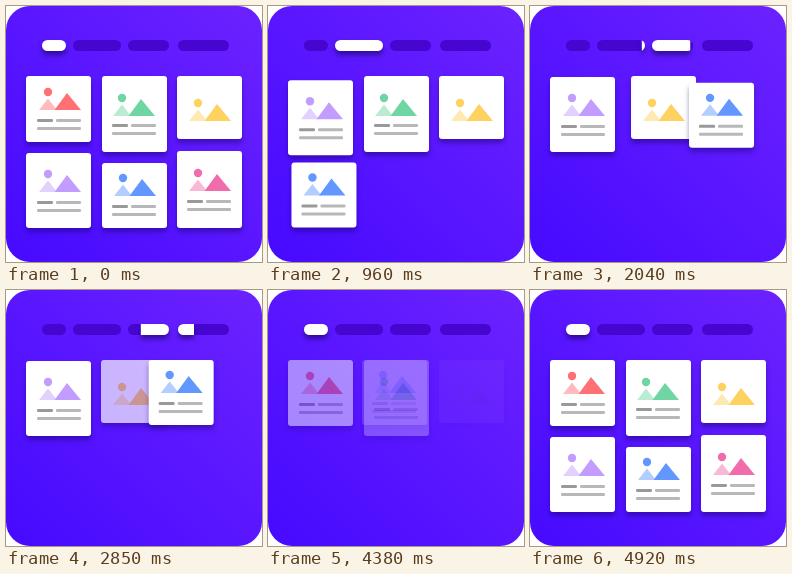
Recreate the animation shown at these times as an HTML page. Size 256 px wide and 256 px high, loop 5010 ms.

```html
<!DOCTYPE html>
<html lang="en">
<head>
<meta charset="utf-8">
<title>Filtered card grid</title>
<style>
  html, body { margin: 0; height: 100%; overflow: hidden; background: #fff; }
  svg { display: block; width: 100vw; height: 100vh; }
  .card { filter: drop-shadow(0 4px 2.5px rgba(20, 0, 90, .42)); }
  .lit { filter: drop-shadow(0 4px 2.5px rgba(10, 0, 60, .5)); }
</style>
</head>
<body>
<svg id="stage" viewBox="0 0 256 256">
  <defs>
    <linearGradient id="bg" x1="0" y1="1" x2="1" y2="0">
      <stop offset="0" stop-color="#460aff"/>
      <stop offset="1" stop-color="#6c22ff"/>
    </linearGradient>
  </defs>
  <rect width="256" height="256" rx="24" fill="url(#bg)"/>
</svg>
<script>
const LOOP = 5010, WIPE = 435;
const SWITCH = [435, 1635, 2715, 3915];   // when each tab hands over to the next
const stage = document.getElementById('stage');

function add(parent, tag, attrs = {}) {
  const el = document.createElementNS('http://www.w3.org/2000/svg', tag);
  for (const k in attrs) el.setAttribute(k, attrs[k]);
  return parent.appendChild(el);
}

const ramp = (t, a, b) => t < a ? 0 : t >= b ? 1 : (t - a) / (b - a);
const mix = (a, b, p) => a + (b - a) * p;

// cubic-bezier(.3, 0, .35, 1)
function ease(x) {
  let lo = 0, hi = 1;
  for (let i = 0; i < 20; i++) {
    const s = (lo + hi) / 2, r = 1 - s;
    if (.9 * s * r * r + 1.05 * s * s * r + s * s * s < x) lo = s; else hi = s;
  }
  return lo * lo * (3 - 2 * lo);
}

// Tabs
const tabs = [[36, 24], [67, 48], [122, 41], [172, 51]].map(([x, width]) => {
  const pill = { x, y: 34, width, height: 11, rx: 5.5 };
  add(stage, 'rect', { ...pill, fill: '#4706cf' });
  return pill;
}).map(pill => add(add(stage, 'g', { class: 'lit' }), 'rect', { ...pill, fill: '#fff' }));

// Cards: icon and lines are offsets inside the card;
// moves are [start, end, x, y], fades are [start, end, opacity]
const fadeIn = i => [4220 + 75 * i, 4545 + 75 * i, 1];
const cards = [
  { x: 20, y: 70, h: 66, color: '#ff7075', icon: [0, 0], lines: [11, 43],
    moves: [], fades: [[435, 705, 0], fadeIn(0)] },
  { x: 96, y: 70, h: 76, color: '#6fd6a3', icon: [-2, 6], lines: [10, 48],
    moves: [], fades: [[1635, 1905, 0], fadeIn(1)] },
  { x: 171, y: 70, h: 63, color: '#ffd15f', icon: [-1, 11],
    moves: [[1635, 2205, 95, 70], [4200, 4200, 171, 70]],
    fades: [[2765, 3035, 0], fadeIn(2)] },
  { x: 20, y: 147, h: 75, color: '#c29cff', icon: [0, 5], lines: [11, 48],
    moves: [[690, 1035, 20, 71], [4440, 4440, 20, 147]],
    fades: [[3915, 4350, 0], fadeIn(3)] },
  { x: 96, y: 157, h: 65, color: '#6197ff', icon: [-1, -1], lines: [10, 42],
    moves: [[690, 1035, 20.3, 156.5], [1635, 2205, 171, 70], [2715, 3165, 94, 70], [4440, 4440, 96, 157]],
    fades: [[4005, 4440, 0], fadeIn(4)] },
  { x: 171, y: 145, h: 77, color: '#f06cab', icon: [-1, 6], lines: [10, 49],
    moves: [], fades: [[485, 755, 0], fadeIn(5)] }
];

for (const c of cards) {
  c.el = add(stage, 'g', { class: 'card' });
  add(c.el, 'rect', { width: 65, height: c.h, rx: 3, fill: '#fff' });
  const icon = add(c.el, 'g', { fill: c.color, transform: `translate(${c.icon})` });
  add(icon, 'circle', { cx: 22, cy: 16, r: 4.2 });
  add(icon, 'path', { d: 'M13 34L22 22.5L31 34Z', opacity: .48 });
  add(icon, 'path', { d: 'M28.5 34L41 17L55 34Z' });
  if (!c.lines) continue;
  const [x, y] = c.lines;
  for (const [dx, dy, width, fill] of [[0, 0, 16, '#999'], [19, 0, 25, '#b8b8b8'], [0, 8, 44, '#b8b8b8']])
    add(c.el, 'rect', { x: x + dx, y: y + dy, width, height: 3, rx: 1.2, fill });
}

function draw(t) {
  const wipe = i => ramp(t, SWITCH[i], SWITCH[i] + WIPE);
  tabs.forEach((tab, i) => {
    const back = i === 0 && t >= SWITCH[3];
    const shown = back ? wipe(3) : i ? wipe(i - 1) : 1;
    const gone = back ? 0 : wipe(i);
    tab.style.clipPath = `inset(0 ${100 - 100 * shown}% 0 ${100 * gone}%)`;
    tab.style.visibility = shown > 0 && gone < 1 ? 'visible' : 'hidden';
  });
  for (const c of cards) {
    let { x, y } = c, alpha = 1;
    for (const [a, b, nx, ny] of c.moves) {
      const p = ease(ramp(t, a, b));
      x = mix(x, nx, p);
      y = mix(y, ny, p);
    }
    for (const [a, b, to] of c.fades) alpha = mix(alpha, to, ramp(t, a, b));
    c.el.setAttribute('transform', `translate(${x.toFixed(2)} ${y.toFixed(2)})`);
    c.el.setAttribute('opacity', alpha);
  }
}

const start = performance.now();
function tick() {
  draw((performance.now() - start) % LOOP);
  requestAnimationFrame(tick);
}
tick();
</script>
</body>
</html>
```
